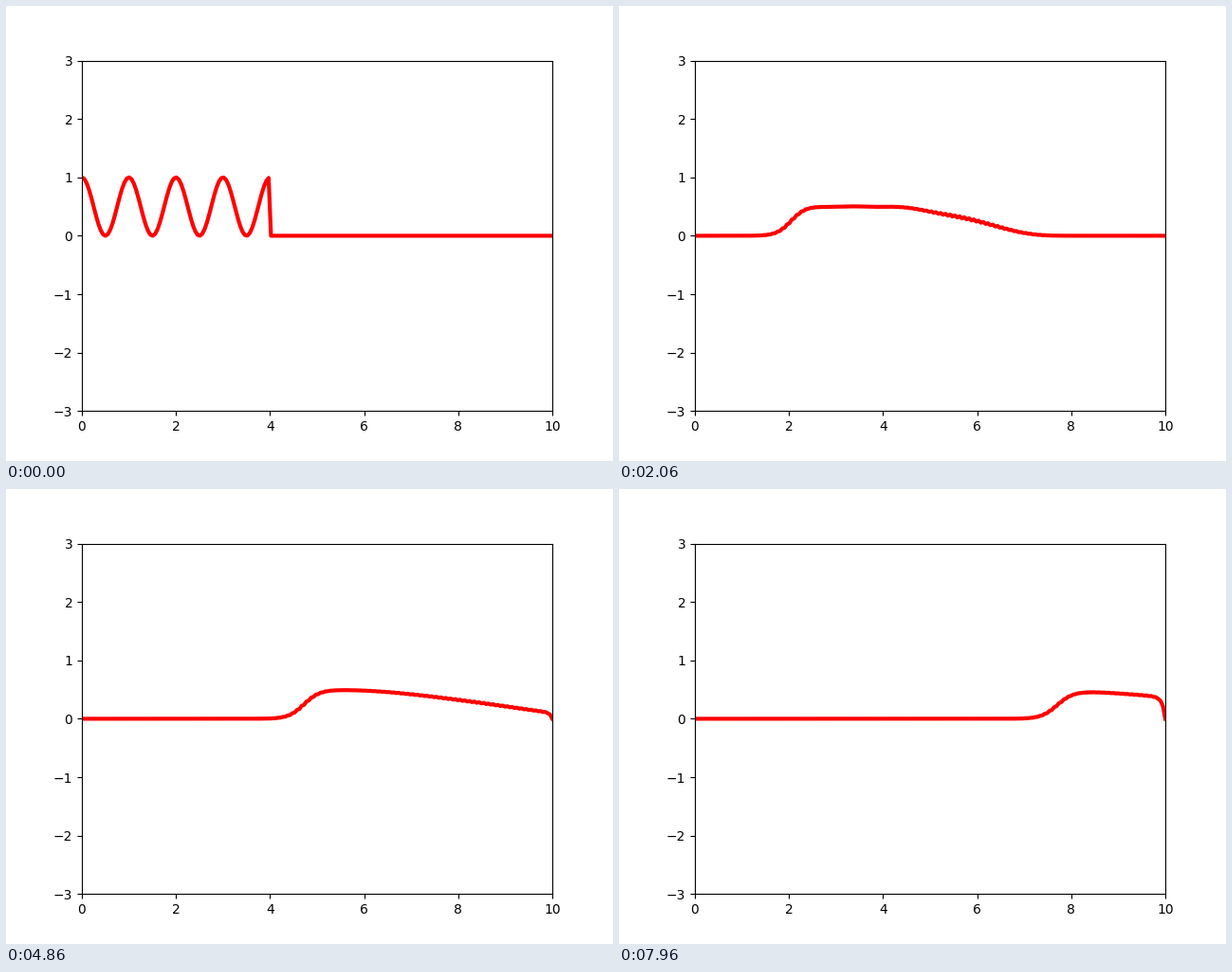
Recreate the animation shown at these times as a matplotlib script. Size 640 by 480 pixels, loop 7.98 s.

```python
import numpy as np
import matplotlib.pyplot as plt
from matplotlib.animation import FuncAnimation

LENGTH, POINTS, FRAMES = 10, 200, 399
DT = 0.0256

x = np.linspace(0, LENGTH, POINTS)
dx = x[1] - x[0]


def flux(u):
    return u * (1 - u / 2)


def step(u):
    """One Lax-Friedrichs step with zero values at both ends."""
    f = flux(u)
    new = np.zeros_like(u)
    new[1:-1] = (u[2:] + u[:-2]) / 2 - DT / (2 * dx) * (f[2:] - f[:-2])
    return new


states = [np.where(x <= 4, np.cos(np.pi * x) ** 2, 0)]
for _ in range(FRAMES - 1):
    states.append(step(states[-1]))

fig = plt.figure(figsize=(6.4, 4.8), dpi=100)
ax = fig.add_subplot(xlim=(0, LENGTH), ylim=(-3, 3))
line, = ax.plot(x, states[0], color="red", lw=3)


def draw(i):
    line.set_ydata(states[i])
    return line,


anim = FuncAnimation(fig, draw, frames=FRAMES, interval=20,
                     repeat=True, repeat_delay=0)
plt.show()
```
